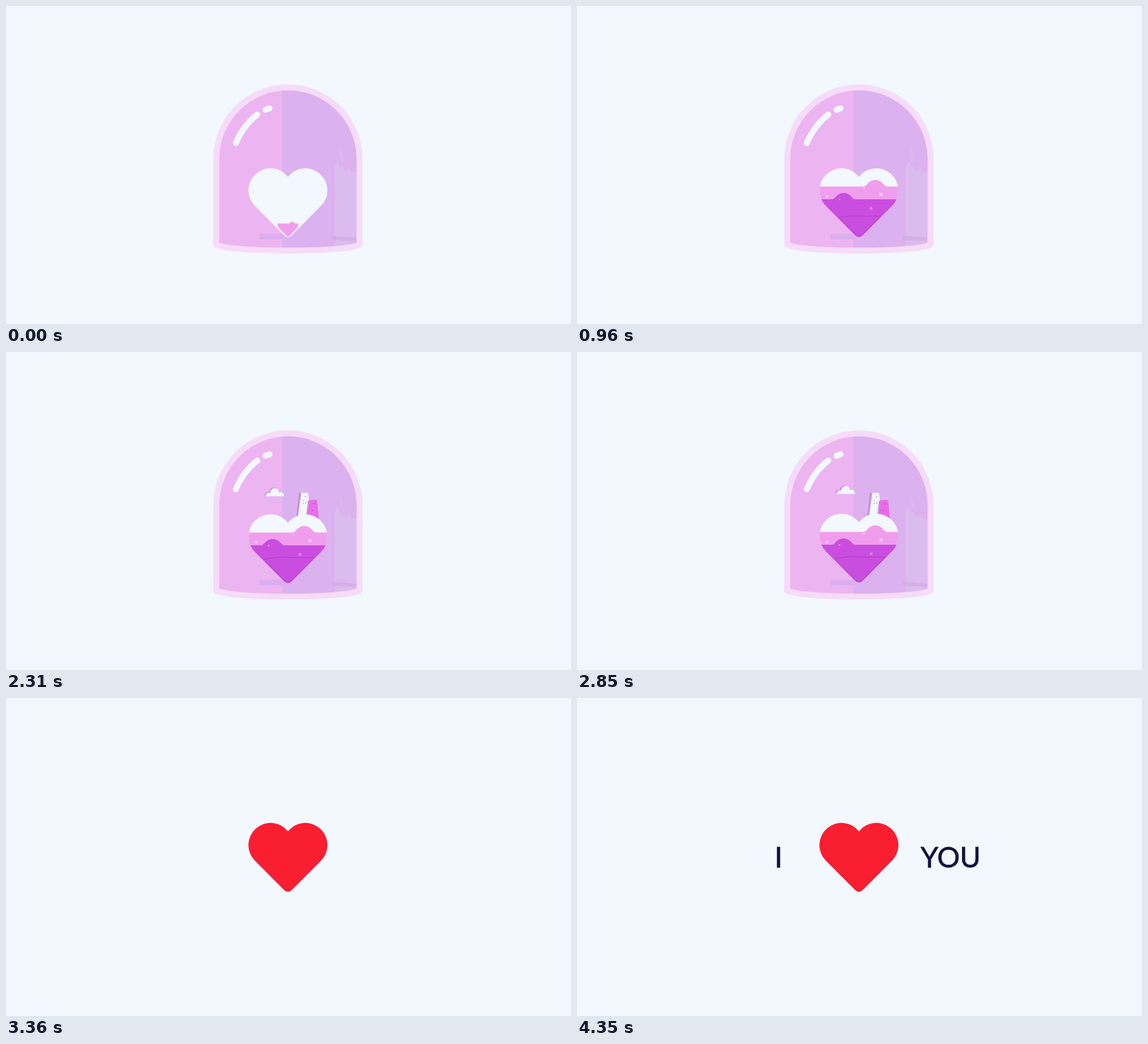
Animation, 998 px wide and 561 px high, one loop 4500 ms. Source, as an HTML page:

```html
<!DOCTYPE html>
<html lang="en">
<head>
<meta charset="utf-8">
<title>I love you</title>
<style>
  html, body { margin: 0; width: 100%; height: 100%; overflow: hidden; background: #f3f7fe; }
  svg { display: block; width: 100vw; height: 100vh; }
  .move { animation: 4500ms linear infinite; }
  .layer { transform-origin: 498px 407px; }

  .pink { animation-name: pink; }
  .purple { animation-name: purple; }
  .deep { animation-name: deep; }
  .tower { animation-name: tower; }
  .block { animation-name: block; }
  .drift { animation-name: drift; }
  .ascend { animation-name: ascend; }
  .dome { animation-name: dome; }
  .heart { animation-name: heart; }
  .red { animation-name: red; }
  .shade { animation-name: shade; }
  .left { animation-name: left; }
  .right { animation-name: right; }

  /* liquids grow out of the heart's tip */
  @keyframes pink {
    0% { transform: scale(.257); animation-timing-function: cubic-bezier(.333, 1.55, .667, 1); }
    12.067%, 100% { transform: none; }
  }
  @keyframes purple {
    0%, 8.889% { transform: scale(0); animation-timing-function: cubic-bezier(.333, 1.467, .667, 1); }
    20.444%, 100% { transform: none; }
  }
  @keyframes deep {
    0%, 15.556% { transform: scale(0); animation-timing-function: cubic-bezier(.333, .8, .667, 1); }
    26.667%, 100% { transform: none; }
  }

  /* skyline */
  @keyframes tower {
    0%, 24% { transform: translateY(48px); animation-timing-function: cubic-bezier(.333, 1.567, .667, 1); }
    34.667%, 100% { transform: none; }
  }
  @keyframes block {
    0%, 30% { transform: translateY(44px); animation-timing-function: cubic-bezier(.333, 1.567, .667, 1); }
    41.111%, 100% { transform: none; }
  }
  @keyframes drift {
    0%, 34.444% { transform: translateX(85px); animation-timing-function: cubic-bezier(.333, .667, .667, 1); }
    47.778%, 100% { transform: none; }
  }
  @keyframes ascend {
    0%, 62.222% { transform: none; animation-timing-function: cubic-bezier(.333, 0, .667, .177); }
    69.556%, 100% { transform: translateY(-290px); }
  }

  /* lift-off */
  @keyframes dome {
    0%, 63.333% { transform: none; animation-timing-function: cubic-bezier(.333, 0, .667, .187); }
    74.667%, 100% { transform: translateY(-450px); }
  }
  @keyframes heart {
    0%, 62.667% { transform: none; animation-timing-function: cubic-bezier(.333, 0, .667, 1); }
    72.111%, 100% { transform: translateY(-66px); }
  }
  @keyframes red {
    0%, 63.556% { opacity: 0; }
    68.444%, 100% { opacity: 1; }
  }
  @keyframes shade {
    0%, 63.556% { opacity: 1; }
    68.444%, 100% { opacity: 0; }
  }

  /* words slide out from behind the heart */
  @keyframes left {
    0%, 77.111% { transform: translateX(140px); animation-timing-function: cubic-bezier(.333, 1, .667, 1); }
    97.778%, 100% { transform: none; }
  }
  @keyframes right {
    0%, 77.111% { transform: translateX(-164px); animation-timing-function: cubic-bezier(.333, 1, .667, 1); }
    97.778%, 100% { transform: none; }
  }
  @keyframes words {
    0%, 76.9% { visibility: hidden; }
    77%, 100% { visibility: visible; }
  }
  .words { animation-name: words; }
  text {
    font: 50px Lato, "Open Sans", sans-serif;
    fill: #15123f; stroke: #15123f; stroke-width: .8; text-anchor: middle;
  }
</style>
</head>
<body>
<svg viewBox="0 0 998 561">
  <defs>
    <path id="heartShape" d="M498 301.3A39 39 0 1 0 439.4 352.6L491 404.2Q498 411.2 505 404.2L556.6 352.6A39 39 0 1 0 498 301.3Z"/>
    <path id="domeShape" d="M371.5 270A126.5 126.5 0 0 1 624.5 270V421C600 435 396 435 371.5 421Z"/>
    <path id="cloudShape" d="M459 254.5C459 249 463 247.5 466.5 249C467.5 238.5 480 237.5 482.5 247.5C487 246 491 249 491 254.5Z"/>
    <clipPath id="inDome"><use href="#domeShape"/></clipPath>
    <clipPath id="below318"><rect x="420" y="318.5" width="160" height="100"/></clipPath>
    <clipPath id="below341"><rect x="420" y="341" width="160" height="80"/></clipPath>
    <clipPath id="besideTower"><rect width="527" height="561"/></clipPath>
    <linearGradient id="blockFill" x1=".6" y1="0" x2=".4" y2="1">
      <stop offset=".6" stop-color="#ea6ceb"/>
      <stop offset=".85" stop-color="#cb50e0"/>
    </linearGradient>
  </defs>

  <g class="move dome">
    <g clip-path="url(#inDome)">
      <rect x="366" y="138" width="122" height="300" fill="#ecb5f1"/>
      <rect x="488" y="138" width="142" height="300" fill="#dcb1ef"/>
      <path d="M580 280H584V275H588V283H596V290H603V287H609V293H620V425H580Z" fill="#dcbbef"/>
      <path d="M589 252h4v10h3v12h-5v-8h-3z" fill="#dcbbef" opacity=".5"/>
      <path d="M576 405L619 409V414L576 413Z" fill="#d3aae5" opacity=".7"/>
      <rect class="move shade" x="448" y="402" width="40" height="9.5" fill="#dcaef0"/>
    </g>
    <use href="#domeShape" fill="none" stroke="#f6dcf8" stroke-width="10.5" stroke-linejoin="round"/>
    <path d="M406 242Q419 211 444 191.5M458.5 183L465.5 180.5" fill="none" stroke="#f3f7fe" stroke-width="10.5" stroke-linecap="round"/>
  </g>

  <g clip-path="url(#besideTower)">
    <g class="move ascend">
      <g class="move drift">
        <use href="#cloudShape" x="-2" y="-1" fill="#bf92d6"/>
        <use href="#cloudShape" fill="#f3f7fe"/>
      </g>
    </g>
  </g>

  <g class="move dome">
    <g class="move tower">
      <path d="M517.5 249H523L517 296H512Z" fill="#bf92d6"/>
      <path d="M521.5 248.5H533.5L540 296H515Z" fill="#f3f7fe"/>
      <path d="M529 253.5v3M525 261v2M529.5 264.5v3.5M525 266v2.5" stroke="#b9b3cf" stroke-width="1.5"/>
    </g>
    <g class="move block">
      <path d="M533.5 262H538L532 308H528Z" fill="#bf92d6"/>
      <path d="M536 261H549.5L554 308H531.5Z" fill="url(#blockFill)"/>
      <path d="M544.5 266.5v2.5M541 278v2.5" stroke="#b845c4" stroke-width="1.5"/>
    </g>
  </g>

  <g class="move words">
    <text class="move left" x="356" y="298.5">I</text>
    <text class="move right" x="660" y="298.5">YOU</text>
  </g>

  <g class="move heart">
    <use href="#heartShape" fill="#f3f7fe"/>
    <g class="move layer pink" fill="#f19dee">
      <use href="#heartShape" clip-path="url(#below318)"/>
      <path d="M505 319.5C514 317 514 307 527 307S540 317 549 319.5Z"/>
      <g fill="#f6c3f6">
        <circle cx="442" cy="336" r="2.2"/>
        <circle cx="537" cy="332.5" r="3"/>
        <circle cx="507" cy="321.5" r="1.4"/>
      </g>
    </g>
    <g class="move layer purple" fill="#c94ee0">
      <use href="#heartShape" clip-path="url(#below341)"/>
      <path d="M449 342C458 340 458 330 471 330S484 340 493 342Z"/>
      <circle cx="519.5" cy="357" r="2.6" fill="#ea7fec"/>
      <circle cx="464" cy="341.5" r="1.2" fill="#ea9cee"/>
    </g>
    <path class="move layer deep" d="M455 366Q478 361 498 362.5L545 363M458 369L491 402.5Q498 409 505 402.5L542 366"
      fill="none" stroke="#a52fae" stroke-width="1" stroke-opacity=".7"/>
    <use class="move red" href="#heartShape" fill="#f91e30"/>
  </g>
</svg>
</body>
</html>
```
